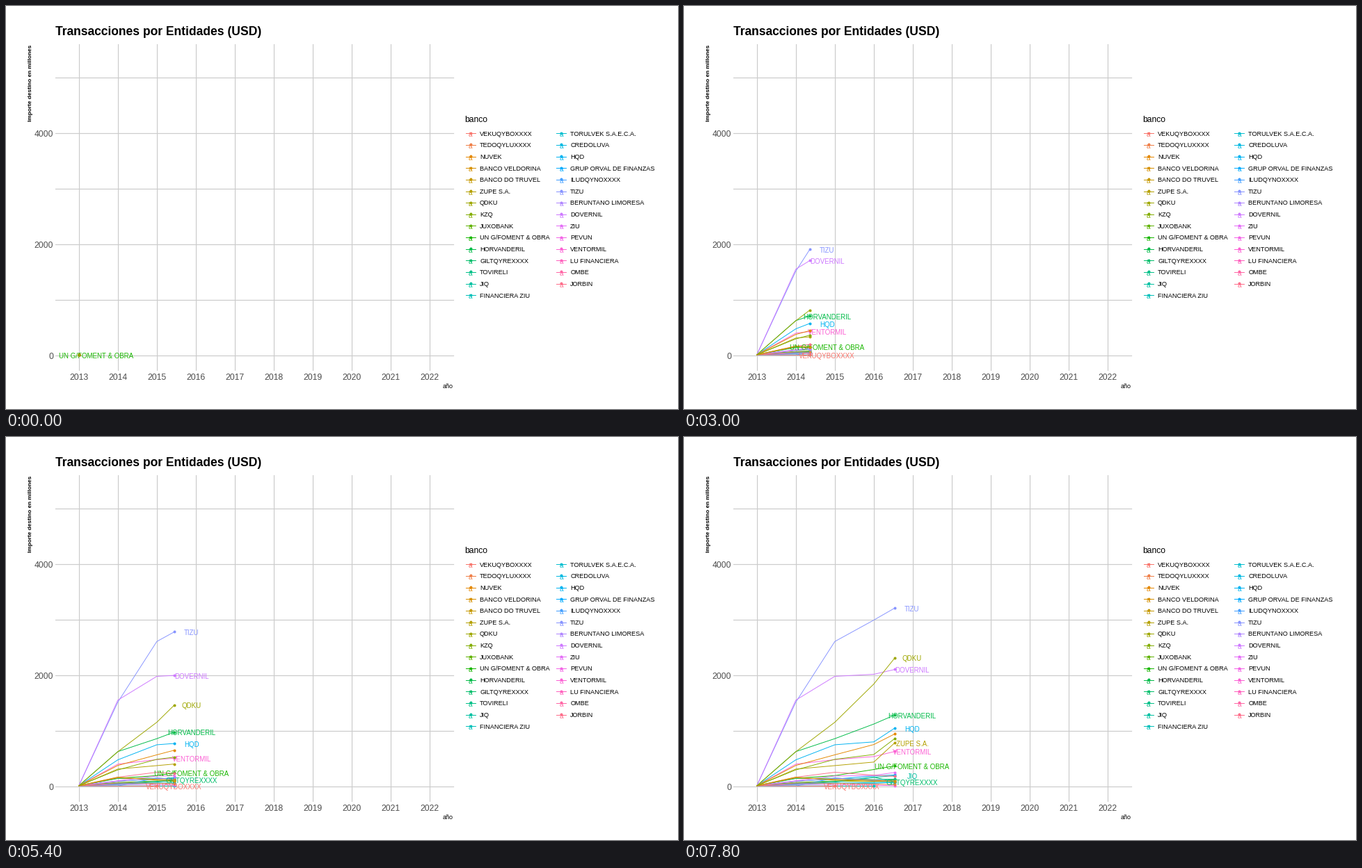
A matplotlib script for the animation above (8000 ms loop, 966 by 580 pixels).

```python
import numpy as np
import matplotlib.pyplot as plt
from matplotlib.animation import FuncAnimation

W, H, DPI = 966, 580, 72          # at 72 dpi one point is one pixel
FRAMES, INTERVAL = 40, 200
YEARS_PER_FRAME = 9 / 99
LEFT, RIGHT, TOP, BOTTOM = 71, 643, 55, 524
START = 10                        # value of every series in the first year
LAST_T = 39 * YEARS_PER_FRAME

NAMES = [
    "VEKUQYBOXXXX", "TEDOQYLUXXXX", "NUVEK", "BANCO VELDORINA",
    "BANCO DO TRUVEL", "ZUPE S.A.", "QDKU", "KZQ", "JUXOBANK",
    "UN G/FOMENT & OBRA", "HORVANDERIL", "GILTQYREXXXX", "TOVIRELI", "JIQ",
    "FINANCIERA ZIU", "TORULVEK S.A.E.C.A.", "CREDOLUVA", "HQD",
    "GRUP ORVAL DE FINANZAS", "ILUDQYNOXXXX", "TIZU", "BERUNTANO LIMORESA",
    "DOVERNIL", "ZIU", "PEVUN", "VENTORMIL", "LU FINANCIERA", "OMBE", "JORBIN",
]

# Values for 2014, 2015, 2016 and the closing moment; shorter rows stop early.
# Later rows are drawn on top.
VALUES = {
    "JUXOBANK": (70, 95, 85, 120),
    "UN G/FOMENT & OBRA": (145, 192, 302, 368),
    "HORVANDERIL": (624, 857, 1120, 1285),
    "GILTQYREXXXX": (50, 90, 163, 78),
    "TOVIRELI": (140, 145, 120, 130),
    "JIQ": (40, 75, 160, 190),
    "FINANCIERA ZIU": (8, 6, 4),
    "TORULVEK S.A.E.C.A.": (60, 50, 70, 75),
    "CREDOLUVA": (30, 60, 55, 70),
    "HQD": (476, 747, 799, 1051),
    "GRUP ORVAL DE FINANZAS": (95, 130, 185, 205),
    "ILUDQYNOXXXX": (5, 150, 100, 90),
    "TIZU": (1514, 2605, 2990, 3210),
    "BERUNTANO LIMORESA": (90, 140, 115, 95),
    "DOVERNIL": (1550, 1978, 2015, 2103),
    "ZIU": (100, 185, 195, 250),
    "PEVUN": (35, 30, 20, 10),
    "VENTORMIL": (398, 480, 535, 628),
    "JORBIN": (163, 253, 200, 178),
    "VEKUQYBOXXXX": (4, 3),
    "TEDOQYLUXXXX": (60, 55, 40, 30),
    "NUVEK": (375, 566, 751, 945),
    "BANCO VELDORINA": (165, 110, 90, 95),
    "BANCO DO TRUVEL": (150, 125, 110, 85),
    "ZUPE S.A.": (310, 372, 436, 788),
    "QDKU": (622, 1152, 1840, 2315),
    "KZQ": (295, 485, 572, 863),
}

# Earlier labels win when two would overlap.
LABELS = [
    "UN G/FOMENT & OBRA", "HORVANDERIL", "TIZU", "HQD", "QDKU", "DOVERNIL",
    "VENTORMIL", "ZUPE S.A.", "VEKUQYBOXXXX", "GILTQYREXXXX", "JIQ",
]


def hcl(hue, chroma=100, lum=65):
    """Polar LUV colour as clipped sRGB."""
    h = np.radians(hue)
    u = chroma * np.cos(h) / (13 * lum) + 0.1978
    v = chroma * np.sin(h) / (13 * lum) + 0.4683
    y = ((lum + 16) / 116) ** 3
    xyz = np.array([9 * y * u / (4 * v), y, y * (12 - 3 * u - 20 * v) / (4 * v)])
    to_rgb = np.array([[3.2406, -1.5372, -0.4986],
                       [-0.9689, 1.8758, 0.0415],
                       [0.0557, -0.2040, 1.0570]])
    rgb = np.clip(to_rgb @ xyz, 0, 1)
    return tuple(np.where(rgb > 0.0031308,
                          1.055 * rgb ** (1 / 2.4) - 0.055, 12.92 * rgb))


COLORS = {name: hcl(15 + 360 * i / len(NAMES)) for i, name in enumerate(NAMES)}


def px(t):
    return 104.7 + 56.05 * t


def py(value):
    return 502.7 - 0.08 * value


plt.rcParams["font.family"] = "Liberation Sans"
fig = plt.figure(figsize=(W / DPI, H / DPI), dpi=DPI, facecolor="white")
ax = fig.add_axes([0, 0, 1, 1])
ax.set(xlim=(0, W), ylim=(H, 0))
ax.axis("off")


def write(x, y, s, size, color="black", **kw):
    return ax.text(x, y, s, fontsize=size, color=color, va="baseline", **kw)


def grid_line(xs, ys):
    ax.plot(xs, ys, color="#cccccc", lw=1.2, zorder=1)


def draw_panel():
    for i in range(10):
        grid_line([px(i)] * 2, [TOP, BOTTOM])
        write(px(i), 537.5, str(2013 + i), 12.1, "#4d4d4d", ha="center")
    for value in range(0, 6000, 1000):
        grid_line([LEFT, RIGHT], [py(value)] * 2)
        if value in (0, 2000, 4000):
            write(68, py(value) + 5.5, str(value), 12.1, "#4d4d4d", ha="right")
    write(71, 42.5, "Transacciones por Entidades (USD)", 17.5, weight="bold")
    write(37, 56, "Importe destino en millones", 8.3, weight="bold", rotation=90,
          rotation_mode="anchor", ha="right")
    write(RIGHT, 550, "año", 9, ha="right")


def draw_legend():
    write(659, 167, "banco", 12.1)
    for i, name in enumerate(NAMES):
        col, row = divmod(i, 15)
        x, y = 661 + 130.2 * col, 183.3 + 16.64 * row
        color = COLORS[name]
        ax.plot([x, x + 13.5], [y, y], color=color, lw=1)
        ax.plot([x + 6.8], [y - 0.5], "o", color=color, ms=4, mew=0)
        write(x + 6.8, y + 5, "a", 10, color, ha="center")
        write(x + 20, y + 3.3, name, 9.1)


draw_panel()
draw_legend()

lines, dots, labels = {}, {}, {}
for name in VALUES:
    color = COLORS[name]
    lines[name], = ax.plot([], [], color=color, lw=0.95, zorder=2)
    dots[name], = ax.plot([], [], "o", color=color, ms=4, mew=0, zorder=5)
for name in LABELS:
    labels[name] = write(0, 0, name, 9.7, COLORS[name], ha="center", zorder=4)

renderer = fig.canvas.get_renderer()
half_width = {n: t.get_window_extent(renderer).width / 2 for n, t in labels.items()}


def knots(name):
    values = (START,) + VALUES[name]
    return np.array([0, 1, 2, 3, LAST_T])[:len(values)], np.array(values)


def place_labels(heads):
    shown = []
    for name in LABELS:
        x, y = heads[name][0] + 24.5, heads[name][1] + 1.3
        free = all(abs(y - b) >= 8.5 or abs(x - a) >= half_width[name] + w
                   for a, b, w in shown)
        labels[name].set_visible(free)
        if free:
            labels[name].set_position((x, y + 3.6))
            shown.append((x, y, half_width[name]))


def update(frame):
    now = frame * YEARS_PER_FRAME
    heads = {}
    for name in VALUES:
        t, values = knots(name)
        end = min(now, t[-1])
        past = t < end
        ts = np.append(t[past], end)
        ys = py(np.append(values[past], np.interp(end, t, values)))
        lines[name].set_data(px(ts), ys)
        heads[name] = (px(end), ys[-1])
        dots[name].set_data([px(end)], [ys[-1]])
    place_labels(heads)
    return [*lines.values(), *dots.values(), *labels.values()]


anim = FuncAnimation(fig, update, frames=FRAMES, interval=INTERVAL,
                     repeat=True, repeat_delay=0, blit=False)
plt.show()
```
